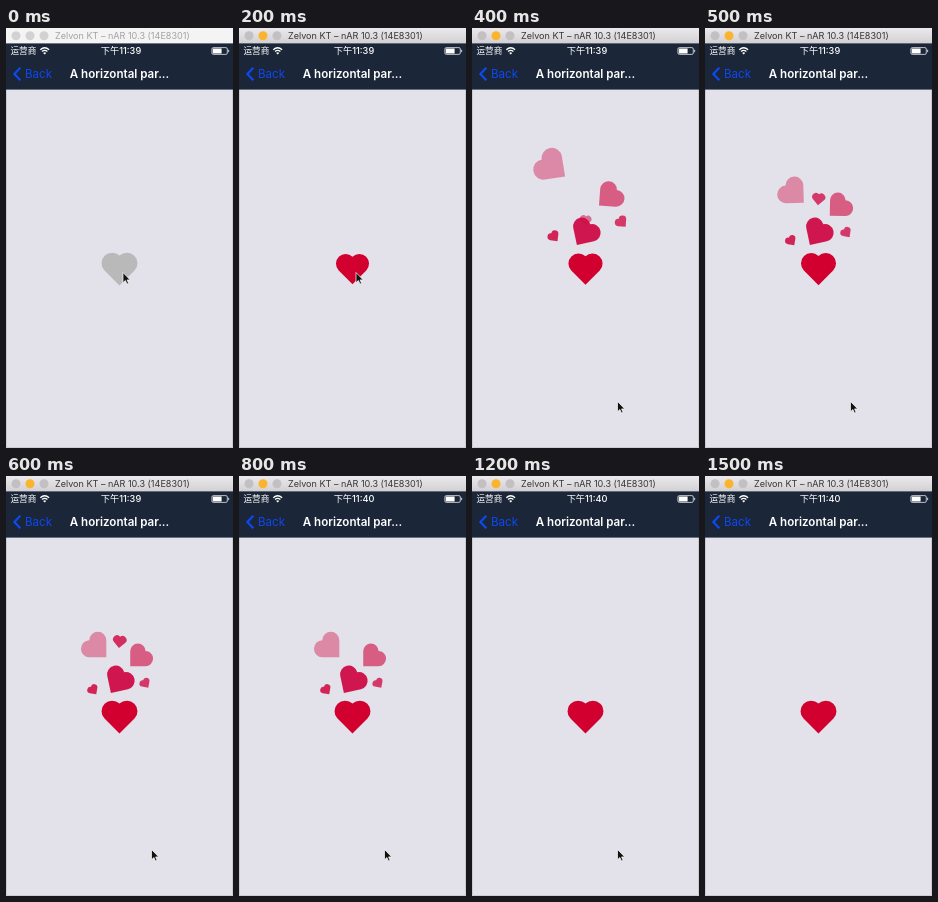
These frames come from a looping animation (227 by 420 pixels, 1.6 s). An HTML page:

```html
<!DOCTYPE html>
<html lang="en">
<head>
<meta charset="utf-8">
<title>Heart button</title>
<style>
  html, body { margin: 0; width: 100%; height: 100%; overflow: hidden; background: #e3e1e9; }
  svg { display: block; width: 227px; height: 420px; }
  text { font-family: Inter, "Noto Sans CJK SC", "Noto Sans CJK", sans-serif; }
</style>
</head>
<body>
<svg viewBox="0 0 227 420">
  <defs>
    <linearGradient id="chrome" x2="0" y2="1">
      <stop stop-color="#ebe9eb"/><stop offset="1" stop-color="#d1cfd1"/>
    </linearGradient>
    <path id="heart" d="M0 .707L-.707 0A.5 .5 0 0 1 0-.707A.5 .5 0 0 1 .707 0Z"/>
  </defs>

  <rect width="227" height="420" fill="#e3e1e9"/>
  <path d="M.5 61V419.5H226.5V61" fill="none" stroke="#cccbd2"/>

  <rect id="bar" width="227" height="16"/>
  <g id="lights">
    <circle cx="10" cy="7.7" r="4.5"/>
    <circle id="amber" cx="24" cy="7.7" r="4.5"/>
    <circle cx="38" cy="7.7" r="4.5"/>
  </g>
  <text id="caption" x="49" y="11.3" font-size="9.05">Zelvon KT – nAR 10.3 (14E8301)</text>

  <rect y="15.4" width="227" height="46.2" fill="#1b2738"/>
  <g fill="#fff">
    <text x="4.5" y="26" font-size="8.6">运营商</text>
    <text id="clock" x="115" y="26.2" font-size="9.2" font-weight="500" text-anchor="middle"></text>
    <text x="113.5" y="50" font-size="11.6" font-weight="600" text-anchor="middle">A horizontal par...</text>
    <g fill="none" stroke="#fff" stroke-width="1.3">
      <path d="M34.3 21.7Q38.7 17.8 43.1 21.7M36 23.6Q38.7 21.3 41.4 23.6"/>
      <rect x="205.9" y="19.6" width="15.4" height="6.8" rx="1.4" stroke-width=".7"/>
    </g>
    <path d="M37.2 24.9Q38.7 23.8 40.2 24.9L38.7 26.5Z"/>
    <rect x="206.8" y="20.5" width="8.8" height="5"/>
    <path d="M222.3 21.6a1.5 1.5 0 0 1 0 2.8z"/>
  </g>
  <path d="M14.3 39.8L8.4 46L14.3 52.2" fill="none" stroke="#0d48f2" stroke-width="2.2"/>
  <text x="19" y="50" font-size="11.6" fill="#0d48f2">Back</text>

  <g id="particles" fill="#d01048"></g>
  <use id="button" href="#heart"/>
  <path id="cursor" d="M0 0V10.2L2.4 8L4 11.6L5.6 10.9L4.1 7.4H7.2Z" fill="#111" stroke="#fff" stroke-width=".7"/>
</svg>
<script>
const LOOP = 1600, STEP = 100;
const origin = { x: 113.5, y: 241 };
const $ = id => document.getElementById(id);
const set = (el, attrs) => {
  for (const name in attrs) el.setAttribute(name, attrs[name]);
};
const pose = (x, y, angle, size) => `translate(${x} ${y}) rotate(${angle}) scale(${size})`;

// Piecewise linear value through [time, value] points.
function track(points, t) {
  const i = points.findIndex(p => p[0] > t);
  if (i < 0) return points[points.length - 1][1];
  if (i === 0) return points[0][1];
  const [t0, a] = points[i - 1], [t1, b] = points[i];
  return a + (b - a) * (t - t0) / (t1 - t0);
}

// x, y: resting offset; peak: how far the spring throws it; end: when it vanishes
const particles = [
  { x: -21.7, y: -68.3, size: 17, angle: -45, alpha: .42, peak: 1.48, end: 1100 },
  { x: 18.4, y: -58.4, size: 15.3, angle: 45, alpha: .63, peak: 1.22, end: 900 },
  { x: -1.9, y: -34.4, size: 17.4, angle: 33, alpha: .97, peak: 1, end: 1200 },
  { x: 0, y: -74.6, size: 8, angle: 6, alpha: .86, peak: .64, end: 800 },
  { x: -25.9, y: -26.5, size: 6.5, angle: -35, alpha: .9, peak: 1.2, end: 1100 },
  { x: 26.2, y: -33, size: 6.4, angle: -35, alpha: .8, peak: 1.4, end: 1200 },
];
for (const p of particles) {
  p.el = document.createElementNS('http://www.w3.org/2000/svg', 'use');
  set(p.el, { href: '#heart' });
  $('particles').append(p.el);
}

function drawParticle(p, t) {
  const { peak } = p;
  const reach = track([[200, 0], [300, peak * .55], [400, peak], [500, 1 + (peak - 1) * .2], [600, 1]], t);
  const stretch = 1 + (reach - 1) * .42;
  set(p.el, {
    transform: pose(origin.x + p.x * reach, origin.y + p.y * reach, p.angle * stretch, p.size * stretch),
    opacity: t > 200 && t < p.end ? p.alpha * Math.min(1, reach) : 0,
  });
}

function draw(t) {
  const active = t >= 100;
  set($('bar'), { fill: active ? 'url(#chrome)' : '#f5f4f5' });
  set($('lights'), { fill: active ? '#c2c0c2' : '#d3d2d3' });
  set($('amber'), { fill: active ? '#fbb42e' : '#d3d2d3' });
  set($('caption'), { fill: active ? '#363537' : '#a3a2a4' });
  $('clock').textContent = t < 800 ? '下午11:39' : '下午11:40';

  const scale = track([[0, 1], [100, .9], [200, .92], [400, .95], [600, 1]], t);
  set($('button'), {
    transform: pose(origin.x, origin.y + 1.6 * scale, 0, 21.2 * scale),
    fill: t < 200 ? '#b9b9b9' : '#d2002e',
  });
  particles.forEach(p => drawParticle(p, t));

  const x = track([[200, 117], [400, 145.5], [1200, 145.5], [1400, 147]], t);
  const y = track([[200, 244.5], [400, 373.5], [1200, 373.5], [1400, 389]], t);
  set($('cursor'), { transform: `translate(${x} ${y})`, opacity: t < 1500 ? 1 : 0 });
}

const start = performance.now();
function tick() {
  const t = (performance.now() - start) % LOOP;
  draw(Math.floor(t / STEP) * STEP);
  requestAnimationFrame(tick);
}
tick();
</script>
</body>
</html>
```
